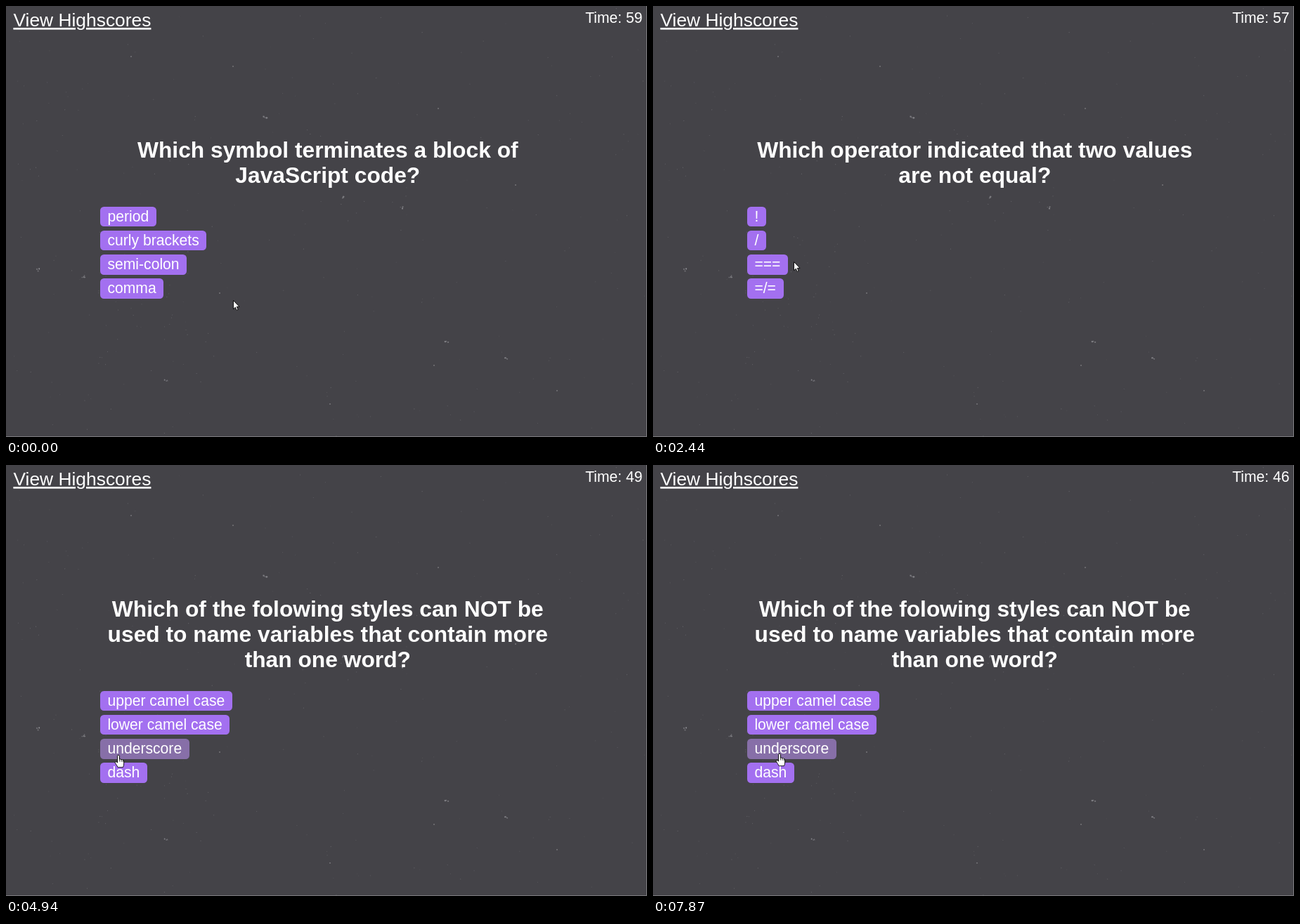
An HTML page for the animation above (7.99 s loop, 912x614 px).

```html
<!DOCTYPE html>
<html lang="en">
<head>
<meta charset="utf-8">
<title>Quiz</title>
<style>
  html, body { margin: 0; width: 100%; height: 100%; overflow: hidden; background: #444348; }
  svg { display: block; }
  text { font-family: "Liberation Sans", Arial, sans-serif; font-size: 21.15px; fill: #fff; }
  .title { font-size: 31.75px; font-weight: bold; text-anchor: middle; }
  .link { font-size: 26.4px; text-decoration: underline; }
  .time { text-anchor: end; }
</style>
</head>
<body>
<svg id="stage" width="912" height="614" viewBox="0 0 912 614">
  <rect width="912" height="614" fill="#444348"/>
  <g id="dust" fill="#b0b0b4"></g>
  <path d="M911.5 0V613.5H0" fill="none" stroke="#7d7c80"/>
  <text class="link" x="10.4" y="29">View Highscores</text>
  <text class="time" id="time" x="905.6" y="24"></text>
  <g id="quiz"></g>
  <g id="cursor" fill="#fff" stroke="#000" stroke-linejoin="round">
    <path id="arrow" d="M.5 .5V12.8L3.3 10.2L5.1 14.4L7.1 13.5L5.3 9.4H9Z" stroke-width=".9"/>
    <g id="hand" stroke-width=".9">
      <path d="M-1.5 11V1.4Q-1.5 .3 0 .3T1.5 1.4V6.2Q3 5.3 4 6.8Q5.6 6 6.2 7.4Q7.7 7 7.7 9V13Q7.7 15.5 6.4 17.7H-.8Q-2.5 14.5 -4.6 11.5Q-5.3 9.3 -3.4 9.5Z"/>
      <path d="M1.5 6V9.5M4 7V9.8M6.2 7.6V10" fill="none" stroke-width=".7"/>
    </g>
  </g>
</svg>
<script>
const LOOP = 7990, LAG = 120;
const STEP = 34.05, BTN_H = 28.6, LEFT = 133.8, PAD = 10.6;
const $ = id => document.getElementById(id);
const { round, floor, min } = Math;

function add(parent, tag, attrs, text) {
  const el = document.createElementNS("http://www.w3.org/2000/svg", tag);
  for (const k in attrs) el.setAttribute(k, attrs[k]);
  if (text) el.textContent = text;
  parent.appendChild(el);
  return el;
}

const questions = [
  { from: 0, top: 285.8,
    title: ["Which symbol terminates a block of", "JavaScript code?"],
    answers: ["period", "curly brackets", "semi-colon", "comma"] },
  { from: 1420, top: 285.8,
    title: ["Which operator indicated that two values", "are not equal?"],
    answers: ["!", "/", "===", "=/="] },
  { from: 3980, top: 321.8,
    title: ["Which of the folowing styles can NOT be", "used to name variables that contain more", "than one word?"],
    answers: ["upper camel case", "lower camel case", "underscore", "dash"] }
];

// Each stroke bends from the previous end past a control point, in even jumps.
const home = [323, 419];
const strokes = [
  { start: 0, end: 600, jumps: 5, bend: [285, 484], to: [220, 397] },
  { start: 600, end: 1020, jumps: 3, bend: [222, 366], to: [229, 365] },
  { start: 1820, end: 2300, jumps: 4, bend: [222, 363], to: [200, 364] },
  { start: 2300, end: 2870, jumps: 4, bend: [178, 368], to: [170, 368] },
  { start: 2870, end: 3140, jumps: 2, bend: [163, 397], to: [160, 413] },
  { start: 5410, end: 5530, jumps: 1, bend: [160, 409], to: [160, 405] },
  { start: 5530, end: 6070, jumps: 4, bend: [216, 346], to: [212, 337] },
  { start: 6640, end: 7240, jumps: 4, bend: [220, 360], to: [198, 404] },
  { start: 7240, end: 7870, jumps: 5, bend: [164, 464], to: [180, 411] }
];

function pointer(t) {
  let pos = home;
  for (const s of strokes) {
    if (t < s.start) break;
    const p = min(s.jumps, floor((t - s.start) / (s.end - s.start) * s.jumps)) / s.jumps;
    const q = 1 - p;
    pos = pos.map((a, i) => q * q * a + 2 * p * q * s.bend[i] + p * p * s.to[i]);
  }
  return pos;
}

// Counts down about once a second; a wrong answer costs five more.
function timeLeft(t) {
  const ticks = floor((t + 90) / 995);
  return 59 - ticks - (ticks >= 5 ? 5 : 0);
}

function buildDust() {
  let seed = 41;
  const rnd = () => (seed = (seed * 16807) % 2147483647) / 2147483647;
  const dot = (x, y, r, opacity) => add($("dust"), "circle", { cx: x, cy: y, r, opacity });
  const clumps = [[369, 158], [563, 288], [45, 376], [110, 385], [627, 478], [712, 501], [228, 534], [479, 272]];
  for (const [x, y] of clumps)
    for (let i = 0; i < 5; i++) dot(x + rnd() * 5 - 2.5, y + rnd() * 4 - 2, .6 + rnd() * .7, .4);
  const specks = [[323, 86], [178, 72], [615, 146], [725, 255], [304, 409], [609, 512], [461, 567], [784, 548]];
  for (const [x, y] of specks) dot(x, y, 1, .45);
  for (let i = 0; i < 230; i++) dot(rnd() * 912, rnd() * 614, .6, .08 + rnd() * .25);
  for (let i = 0; i < 50; i++) dot(130 + rnd() * 130, 320 + rnd() * 200, .6, .1 + rnd() * .25);
}

function buildQuestion(q) {
  q.el = add($("quiz"), "g", {});
  q.title.forEach((line, i) => add(q.el, "text", { class: "title", x: 457.8, y: 216 + 36 * i }, line));
  q.buttons = q.answers.map((answer, i) => {
    const y = q.top + STEP * i, top = round(y), left = round(LEFT);
    const box = add(q.el, "rect", { x: left, y: top, height: round(y + BTN_H) - top, rx: 5.3 });
    const label = add(q.el, "text", { x: LEFT + PAD, y: round(y + 21.5) }, answer);
    const right = round(LEFT + label.getComputedTextLength() + 2 * PAD);
    box.setAttribute("width", right - left);
    return { box, y, right };
  });
}

function draw(t) {
  const q = questions.filter(item => item.from <= t).pop();
  const [x, y] = pointer(t);
  // Hover state catches up shortly after the question changes.
  const stale = q.from > 0 && t < q.from + LAG;
  const inside = b => x >= LEFT && x <= b.right && y >= b.y && y <= b.y + BTN_H;
  const over = stale ? null : q.buttons.find(inside);
  const pointing = stale || !!over;

  questions.forEach(item => item.el.setAttribute("display", item === q ? "inline" : "none"));
  q.buttons.forEach(b => b.box.setAttribute("fill", b === over ? "#876fa8" : "#a370f0"));
  $("time").textContent = "Time: " + timeLeft(t);
  $("cursor").setAttribute("transform", `translate(${round(x)} ${round(y)})`);
  $("hand").setAttribute("display", pointing ? "inline" : "none");
  $("arrow").setAttribute("display", pointing ? "none" : "inline");
}

buildDust();
questions.forEach(buildQuestion);
const start = performance.now();
function tick() {
  draw((performance.now() - start) % LOOP);
  requestAnimationFrame(tick);
}
tick();
</script>
</body>
</html>
```
